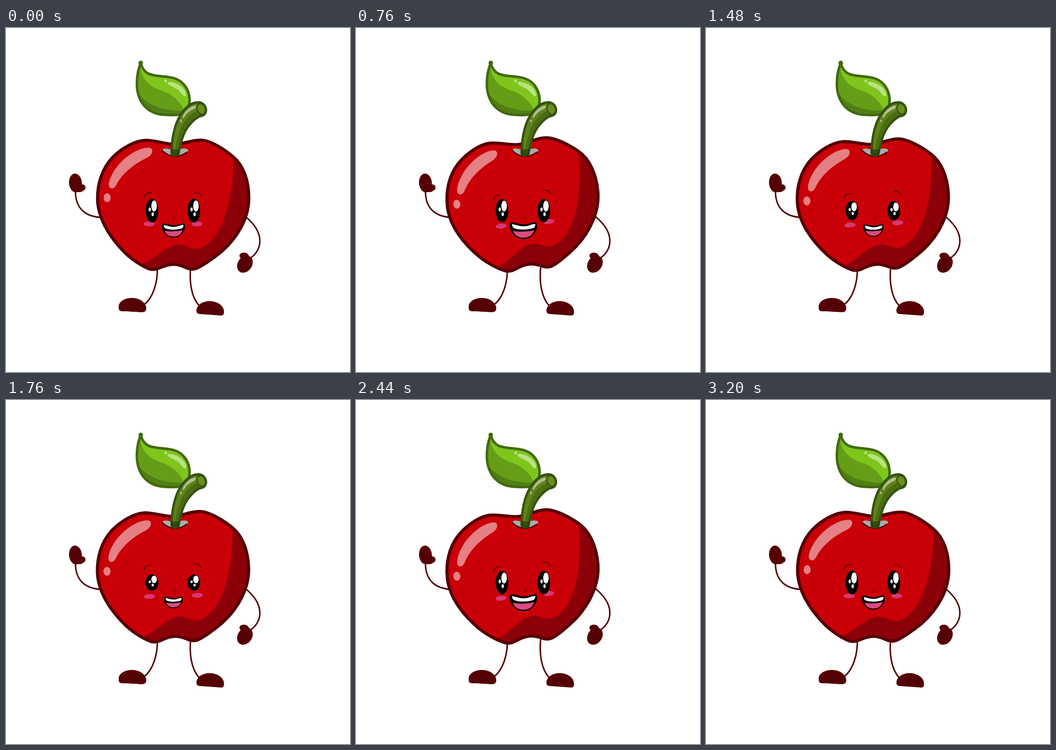
Write an HTML page with a canvas that moves like this. It is 748x748 px and loops after 3.52 s.

```html
<!DOCTYPE html>
<html lang="en">
<head>
<meta charset="utf-8">
<title>Waving apple</title>
<style>
html, body { margin: 0; width: 100%; height: 100%; overflow: hidden; background: #fff; }
canvas { display: block; width: 100vmin; height: 100vmin; }
</style>
</head>
<body>
<canvas id="stage"></canvas>
<script>
const SIZE = 748, LOOP = 3520, MOVE = 3200, BEAT = 400, STEP = 40;
const canvas = document.getElementById('stage');
const ratio = window.devicePixelRatio || 1;
canvas.width = canvas.height = SIZE * ratio;
const ctx = canvas.getContext('2d');

const DARK = '#550004', RED = '#c90007', SHADE = '#8c0008';
const LEAF_EDGE = '#42690f', STEM_EDGE = '#345211';

// One value per beat
const TILT = [0, 7, -7, 7, -7, 7, -7, 7, 0];
const MOUTH = [1, .5, 1.2, .5, .98, .5, 1.2, .5, 1];
const EYES = [1, .07, 1, .07, 1, .07, 1, .07, 1];

const linear = p => p;
const sine = p => (1 - Math.cos(Math.PI * p)) / 2;

function track(keys, t, ease) {
  const i = Math.min(Math.floor(t / BEAT), keys.length - 2);
  return keys[i] + (keys[i + 1] - keys[i]) * ease(t / BEAT - i);
}

const shape = d => new Path2D(d);

const body = shape('M365 253C345 252 324 244 305 244C282 244 252 261 232 281C208 306 199 340 199 370C199 412 224 454 259 489C279 508 301 520 312 524C331 529 340 514 364 514C388 514 395 529 413 523C424 519 447 504 469 486C503 456 528 414 528 370C528 333 517 299 494 280C474 263 450 249 433 245C412 240 390 252 365 253Z');
const bodyShade = shape('M495 270C495 330 489 372 474 415C460 451 440 475 418 480C400 483 390 470 373 471C352 473 330 496 296 514L310 560L560 560L560 270Z');
const shine = shape('M318 266C317 258 303 260 291 264C262 275 232 304 224 336C221 351 234 353 240 341C251 319 274 299 299 286C312 280 319 274 318 266Z');
const cavity = shape('M340 266C342 260 350 262 358 264L377 264C383 261 396 261 396 266C395 271 391 272 387 273C372 281 356 280 340 266Z');
const cavityRim = shape('M339 266Q365 290 393 270');
const stem = shape('M360 273C360 245 365 212 379 190C390 173 402 163 414 162C428 159 438 172 434 184C431 191 425 191 419 193C403 202 389 221 383 241C379 255 376 264 375 274C371 278 363 278 360 273Z');
const stemLight = shape('M363 262C364 235 369 207 382 190C394 174 405 165 417 164L418 179C398 186 384 205 377 227C371 244 369 256 368 265Z');
const stemShine = shape('M384 195C385 186 396 172 409 169C415 168 414 173 409 176C400 180 394 184 390 190C388 194 385 197 384 195Z');
const stemBase = shape('M359 264L379 264L376 275Q368 279 360 275Z');
const leaf = shape('M293 76C284 97 282 127 288 146C297 175 320 189 350 189C365 190 379 189 388 186C397 178 400 167 399 152C397 132 385 116 368 110C349 103 326 107 309 99C299 93 295 86 293 76Z');
const leafLight = shape('M292 78C292 112 313 128 338 136C366 145 382 164 390 186L430 170L410 90L310 70Z');
const leafDark = shape('M280 130C298 160 324 181 392 180L392 200L300 200L270 150Z');
const leafShine = shape('M351 119C355 114 372 120 381 127C390 135 394 144 391 148C387 151 382 142 375 135C366 128 351 125 351 119Z');
const leftFoot = shape('M245 608C244 594 259 587 274 587C293 587 305 599 305 609C305 616 301 618 295 618C279 617 263 616 253 616C247 616 245 613 245 608Z');
const rightFoot = shape('M414 614C415 601 429 593 445 594C464 595 475 607 474 618C474 624 471 626 465 625L423 622C416 622 414 619 414 614Z');
const limbs = [
  'M151 355C151 390 170 411 210 412', 'M518 408C541 426 552 445 552 463C552 479 544 491 532 500',
  'M329 515C331 555 319 587 300 602', 'M402 515C398 550 402 585 421 605'
].map(shape);
const mouth = shape('M-23 -12C-17 -15 -10 -9 1 -9C11 -9 18 -15 23 -12C26 1 14 15 0 15C-14 15 -26 1 -23 -12Z');
const teeth = shape('M-21 -11C-13 -10 -8 -7 1 -7C11 -7 16 -12 22 -11C22 -8 21 -6 19 -4C7 0 -9 0 -18 -4C-20 -6 -21 -8 -21 -11Z');
const tongue = shape('M-19 1C-9 4 9 3 20 0C17 10 9 14 0 14C-9 14 -17 9 -19 1Z');
const brows = shape('M301 368C301 361 307 357 316 358M409 358C417 356 423 360 425 367');
const nose = shape('M365 418C361 414 361 411 364 412L365 413L366 412C369 411 369 414 365 418Z');

function fill(path, color) {
  ctx.fillStyle = color;
  ctx.fill(path);
}

function line(path, color, width) {
  ctx.strokeStyle = color;
  ctx.lineWidth = width;
  ctx.stroke(path);
}

function oval(x, y, rx, ry, color, turn = 0) {
  ctx.beginPath();
  ctx.ellipse(x, y, rx, ry, turn, 0, 7);
  ctx.fillStyle = color;
  ctx.fill();
}

function inside(clip, draw) {
  ctx.save();
  ctx.clip(clip);
  draw();
  ctx.restore();
}

function placed(x, y, turn, sx, sy, draw) {
  ctx.save();
  ctx.translate(x, y);
  ctx.rotate(turn);
  ctx.scale(sx, sy);
  draw();
  ctx.restore();
}

function drawLimbs() {
  limbs.forEach(p => line(p, DARK, 3.2));
  oval(151, 337, 14, 20.5, DARK, -.08);
  oval(166, 347, 7, 7, DARK);
  oval(160, 350, 9, 7, DARK);
  oval(519.5, 513.5, 15.5, 20, DARK, .6);
  oval(518, 496, 10.5, 7.5, DARK, .15);
  fill(leftFoot, DARK);
  fill(rightFoot, DARK);
}

function drawBody() {
  ctx.translate(-363.5, -384);
  fill(body, RED);
  inside(body, () => fill(bodyShade, SHADE));
  line(body, DARK, 6.7);
  fill(shine, '#e58084');
  oval(220, 369, 7.7, 9.7, '#e58084');
  oval(311, 426, 12, 5.3, '#d83872');
  oval(415, 426, 12, 5.3, '#d83872');
  line(brows, '#320004', 1.6);
  fill(nose, SHADE);
}

function drawTop() {
  fill(cavity, '#a9abad');
  line(cavityRim, '#420006', 2.5);

  fill(leaf, '#669d17');
  inside(leaf, () => {
    fill(leafDark, '#527f15');
    fill(leafLight, '#7fc51c');
  });
  line(leaf, LEAF_EDGE, 5.5);
  oval(293, 76, 4.9, 5, LEAF_EDGE);
  fill(leafShine, '#b9e283');
  oval(347, 115, 3, 3, '#b9e283');

  fill(stem, '#4c6c12');
  inside(stem, () => fill(stemLight, '#5f8219'));
  line(stem, STEM_EDGE, 5);
  oval(425, 176, 10.5, 13.5, STEM_EDGE, -.4);
  oval(424.5, 176, 7.5, 10.5, '#6a8c1e', -.4);
  fill(stemShine, '#b0bf8d');
  oval(380.5, 202, 1.8, 3, '#b0bf8d');
  fill(stemBase, 'rgba(30,45,10,.5)');
}

function drawEye() {
  oval(0, 0, 13.7, 26, '#000');
  oval(4.5, -10, 6, 12, '#fff');
  oval(-5, -2.5, 2.5, 4.3, '#fff');
  oval(1.5, 8, 2.5, 4.3, '#fff');
}

function drawMouth() {
  fill(mouth, '#000');
  line(mouth, '#000', 3);
  fill(tongue, '#dc4a80');
  fill(teeth, '#fff');
}

function render(now) {
  const clock = Math.floor((now % LOOP) / STEP) * STEP;
  const t = Math.min(clock, MOVE);
  const tilt = track(TILT, t, linear) * Math.PI / 180;
  const open = track(EYES, t, sine);
  const smile = track(MOUTH, t, sine);

  ctx.setTransform(ratio, 0, 0, ratio, 0, 0);
  ctx.fillStyle = '#fff';
  ctx.fillRect(0, 0, SIZE, SIZE);
  ctx.lineCap = ctx.lineJoin = 'round';

  drawLimbs();
  placed(363.5, 384, tilt, 1, 1, drawBody);
  drawTop();
  placed(317.5, 397, 0, 1, open, drawEye);
  placed(408.5, 397, 0, 1, open, drawEye);
  placed(364, 439.5, 0, smile, smile, drawMouth);
}

const start = performance.now();
function loop() {
  render(performance.now() - start);
  requestAnimationFrame(loop);
}
loop();
</script>
</body>
</html>
```
